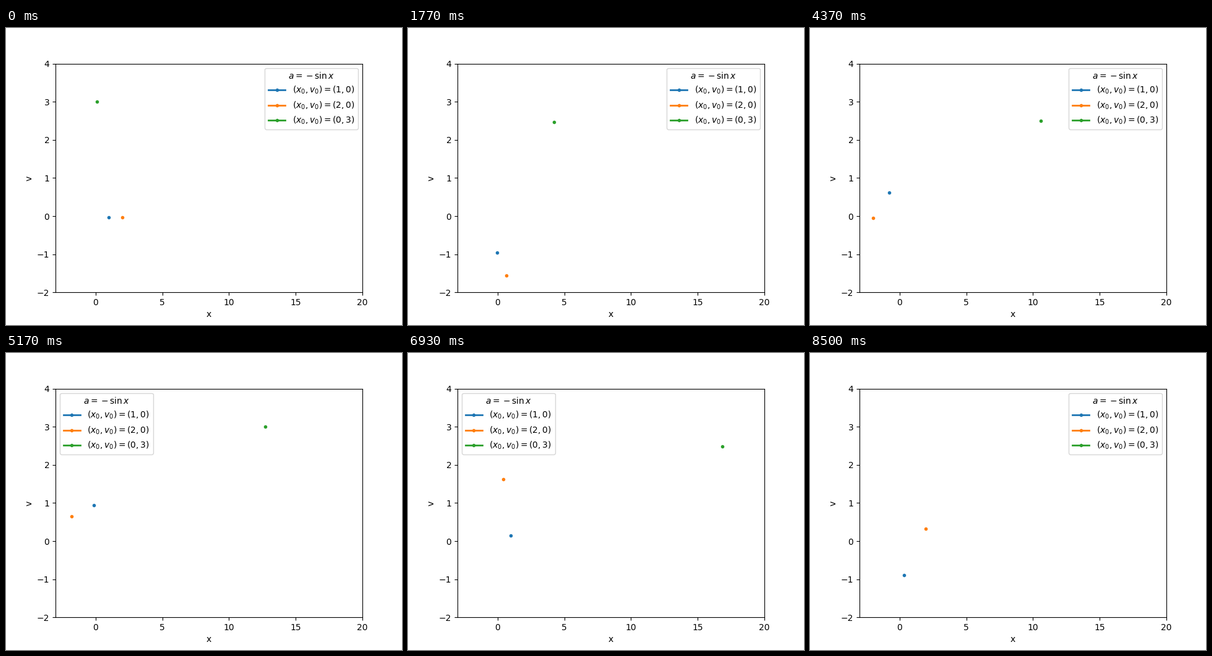
Animation, 640 px wide and 480 px high, one loop 8.53 s. Source, as a matplotlib script:

```python
import numpy as np
import matplotlib.pyplot as plt
from matplotlib.animation import FuncAnimation

LOOP_MS = 8530
FRAMES = 256
DT = 1 / 32
SUBSTEPS = 4
STARTS = [(1, 0), (2, 0), (0, 3)]


def slope(s):
    x, v = s
    return np.array([v, -np.sin(x)])


def rk4(s, h):
    k1 = slope(s)
    k2 = slope(s + h / 2 * k1)
    k3 = slope(s + h / 2 * k2)
    k4 = slope(s + h * k3)
    return s + h / 6 * (k1 + 2 * k2 + 2 * k3 + k4)


def solve():
    """Phase-space states, one step ahead of the start, shape (frame, xv, body)."""
    s = np.array(STARTS, dtype=float).T
    states = []
    for _ in range(FRAMES):
        for _ in range(SUBSTEPS):
            s = rk4(s, DT / SUBSTEPS)
        states.append(s)
    return np.array(states)


states = solve()

fig, ax = plt.subplots(figsize=(6.4, 4.8), dpi=100)
ax.set(xlim=(-3, 20), ylim=(-2, 4), xlabel="x", ylabel="v")
lines = [
    ax.plot([], [], ".-", lw=2, label=f"$(x_0, v_0) = ({x0}, {v0})$")[0]
    for x0, v0 in STARTS
]
# "best" lets the legend jump aside when a point runs under it
ax.legend(title=r"$a = -\sin x$", loc="best")


def update(i):
    for line, x, v in zip(lines, *states[i]):
        line.set_data([x], [v])
    return lines


anim = FuncAnimation(fig, update, frames=FRAMES, interval=LOOP_MS / FRAMES,
                     repeat=True, repeat_delay=0)
plt.show()
```
